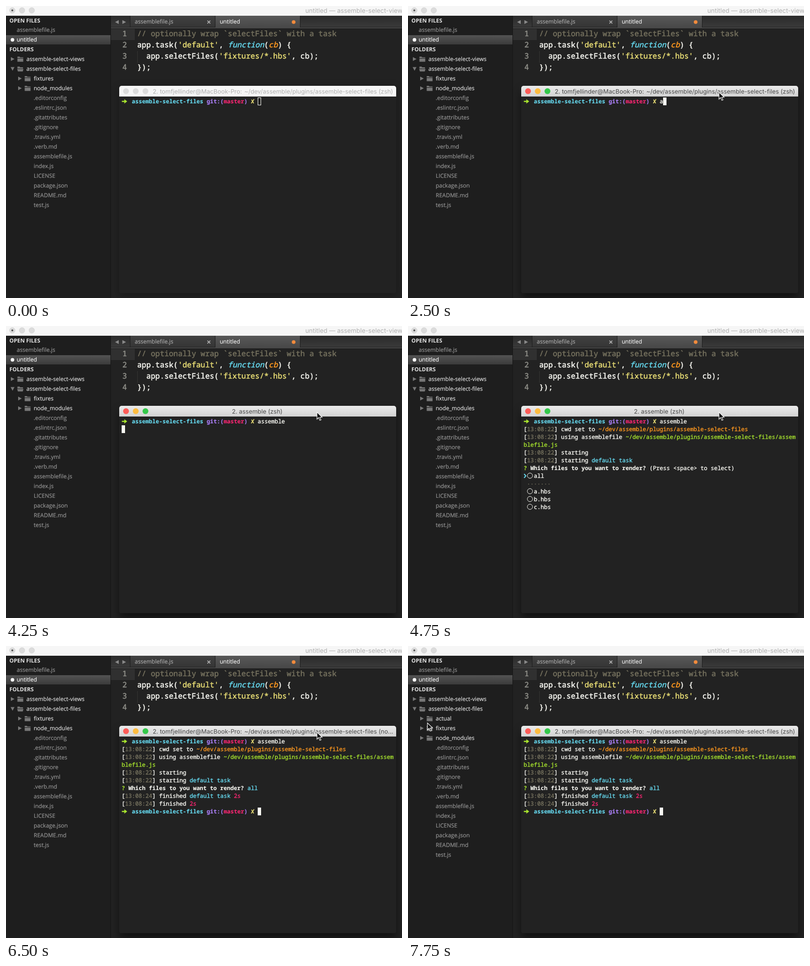
An HTML page that plays this animation: 815 px wide and 600 px high, repeating every 8000 ms.

```html
<!DOCTYPE html>
<html lang="en">
<head>
<meta charset="utf-8">
<title>Editor and terminal</title>
<style>
  html, body { margin: 0; width: 100%; height: 100%; overflow: hidden; background: #222; }
  svg { display: block; width: 815px; height: 600px; text-rendering: geometricPrecision; }
  text { white-space: pre; stroke-width: 0; stroke-linejoin: round; }
  .ui { font: 11.6px "Open Sans", "Noto Sans", sans-serif; stroke-width: .2px; }
  .head { font: bold 11.3px "Open Sans", "Noto Sans", sans-serif; }
  .app { font: 12.9px Inter, Roboto, sans-serif; }
  .title { font: 12.45px Inter, Roboto, sans-serif; }
  .code { font: 15.55px "Noto Sans Mono", "DejaVu Sans Mono", monospace; stroke-width: .5px; }
  .term { font: 11.667px "Noto Sans Mono", "DejaVu Sans Mono", monospace; stroke-width: .4px; }
  .bold { font-weight: bold; stroke-width: .1px; }
  .italic { font-style: italic; }
</style>
</head>
<body>
<svg id="stage" viewBox="0 0 815 600" xmlns="http://www.w3.org/2000/svg">
  <defs>
    <linearGradient id="strip" x2="0" y2="1"><stop stop-color="#2b2b2b"/><stop offset="1" stop-color="#3a3a3a"/></linearGradient>
    <linearGradient id="tab" x2="0" y2="1"><stop stop-color="#414141"/><stop offset="1" stop-color="#353535"/></linearGradient>
    <linearGradient id="tabOn" x2="0" y2="1"><stop stop-color="#585858"/><stop offset="1" stop-color="#484848"/></linearGradient>
    <linearGradient id="row" x2="0" y2="1"><stop stop-color="#535353"/><stop offset="1" stop-color="#3b3b3b"/></linearGradient>
    <linearGradient id="bar" x2="0" y2="1"><stop stop-color="#ebebeb"/><stop offset="1" stop-color="#d2d2d2"/></linearGradient>
    <filter id="blur" x="-20%" y="-20%" width="140%" height="140%"><feGaussianBlur stdDeviation="9"/></filter>
  </defs>
  <g id="editor"></g>
  <g id="tree"></g>
  <g id="terminal"></g>
  <path id="mouse" d="M0 0V14.5l3.4-3.2 2.5 5.6 2.4-1-2.4-5.4h4.7z" fill="#111" stroke="#fff" stroke-width="1.1"/>
</svg>
<script>
const LOOP = 8000;
const C = {
  white: '#f8f8f2', gray: '#75715e', cyan: '#66d9ef', green: '#a6e22e',
  orange: '#fd971f', yellow: '#e6db74', pink: '#f92672', purple: '#ae81ff'
};
const $ = id => document.getElementById(id);
const esc = s => s.replace(/&/g, '&amp;').replace(/</g, '&lt;');
const text = (x, y, s, fill, cls, extra = '') =>
  `<text x="${x}" y="${y}" fill="${fill}" stroke="${fill}" class="${cls}" ${extra}>${esc(s)}</text>`;
const rect = (x, y, w, h, fill, extra = '') =>
  `<rect x="${x}" y="${y}" width="${w}" height="${h}" fill="${fill}" ${extra}/>`;
const dot = (x, y, r, fill, extra = '') => `<circle cx="${x}" cy="${y}" r="${r}" fill="${fill}" ${extra}/>`;
const path = (x, y, d, fill, extra = '') =>
  `<path transform="translate(${x} ${y})" d="${d}" fill="${fill}" ${extra}/>`;

const RIGHT = 'M-3.5-4L4 0-3.5 4z', LEFT = 'M3.5-4L-4 0 3.5 4z', DOWN = 'M-4-3.5H4L0 4z';

// Editor: window bar, tabs and code
function codeLine(n, parts) {
  const y = 39 + 23 * n;
  return text(239.5, y, String(n), '#90908a', 'code') + parts.map(([col, s, color, cls = '']) =>
    text(270 + col * 9.33, y, s, C[color], 'code ' + cls)).join('');
}

function tabs() {
  return rect(216, 20, 599, 24, 'url(#strip)') +
    rect(256, 20, 175, 24, 'url(#tab)') +
    rect(216, 43, 599, 1, '#222') +
    rect(431, 20, 174, 24, 'url(#tabOn)') +
    [255, 430, 605].map(x => rect(x, 20, 1, 24, '#1c1c1c')).join('') +
    rect(216, 44, 599, 2, '#484848') + rect(216, 46, 599, 1, '#1c1c1c') +
    path(228.5, 33, LEFT, '#8a8a8a') + path(243, 33, RIGHT, '#8a8a8a') +
    text(265, 36, 'assemblefile.js', '#a8a8a8', 'ui') +
    path(417.5, 33, 'M-3-3L3 3M3-3L-3 3', 'none', 'stroke="#b8b8b8" stroke-width="1.7"') +
    text(440, 36, 'untitled', '#eee', 'ui') +
    dot(592, 33, 3.8, '#f28b3c');
}

function editor() {
  return rect(0, 0, 815, 600, '#222') +
    rect(0, 0, 815, 20, '#f6f6f6') +
    [13, 33, 53].map(x => dot(x, 9, 5.7, '#dcdcdc', 'stroke="#cfcfcf" stroke-width=".7"')).join('') +
    dot(13, 9, 2, '#555') +
    text(616, 14, 'untitled — assemble-select-view', '#b0b0b0', 'app') +
    tabs() +
    rect(216, 47, 49, 23, '#303030') +
    '<path d="M270.5 93v23" stroke="#4a4a45" stroke-dasharray="1 1"/>' +
    codeLine(1, [[0, '// optionally wrap `selectFiles` with a task', 'gray']]) +
    codeLine(2, [[0, 'app.task(', 'white'], [9, "'default'", 'yellow'], [18, ',', 'white'],
      [20, 'function', 'cyan', 'italic'], [28, '(', 'white'], [29, 'cb', 'orange', 'italic'],
      [31, ') {', 'white']]) +
    codeLine(3, [[2, 'app.selectFiles(', 'white'], [18, "'fixtures/*.hbs'", 'yellow'], [34, ', cb);', 'white']]) +
    codeLine(4, [[0, '});', 'white']]);
}

// Sidebar
const FILES = ['.editorconfig', '.eslintrc.json', '.gitattributes', '.gitignore', '.travis.yml',
  '.verb.md', 'assemblefile.js', 'index.js', 'LICENSE', 'package.json', 'README.md', 'test.js'];

function folder(x, y, name, open) {
  const body = open ? 'M0-4.5h4.5l1 1.5h6v2.5H0zM-.5.5h13L11 5.5H1z' : 'M0-5h4.5l1 1.5H12v1.5H0zM0-1h12v6.5H0z';
  return path(x, y, open ? DOWN : RIGHT, '#777') + path(x + 10, y, body, '#777') +
    text(x + 28.5, y + 4, name, '#dcdcdc', 'ui');
}

function tree(hasOutput) {
  const dirs = hasOutput ? ['actual', 'fixtures', 'node_modules'] : ['fixtures', 'node_modules'];
  const top = 149 + 20 * dirs.length;
  return rect(0, 20, 215, 580, '#1e1e1e') + rect(215, 20, 1, 580, '#161616') +
    text(7, 34, 'OPEN FILES', '#e2e2e2', 'head') +
    text(22, 53, 'assemblefile.js', '#959595', 'ui') +
    rect(0, 60, 215, 19, 'url(#row)') +
    dot(13.3, 69.5, 3.7, '#fff') + text(22, 73, 'untitled', '#f2f2f2', 'ui') +
    text(7, 93, 'FOLDERS', '#e2e2e2', 'head') +
    folder(13.5, 109, 'assemble-select-views') +
    folder(13.5, 129, 'assemble-select-files', true) +
    dirs.map((name, i) => folder(28.5, 149 + 20 * i, name)).join('') +
    FILES.map((name, i) => text(57, top + 4 + 20 * i, name, '#959595', 'ui')).join('');
}

// Terminal
const X = col => 238 + 7 * col;
const Y = row => 196 + 16 * row;
const line = (row, ...parts) => parts.map(([col, s, color, cls = '']) =>
  text(X(col), Y(row) + 4, s, C[color], 'term ' + cls)).join('');
const stamp = (row, time, ...parts) =>
  line(row, [0, '[', 'white'], [1, time, 'gray'], [9, ']', 'white'], ...parts);
const block = (row, col) => rect(X(col), Y(row) - 8, 7, 16, C.white);

function prompt(row) {
  return path(238, Y(row), 'M.5-1.2h5v-3.3l6 4.5-6 4.5v-3.3h-5z', C.green) +
    line(row, [3, 'assemble-select-files', 'cyan', 'bold'], [25, 'git:(', 'purple', 'bold'],
      [30, 'master', 'pink', 'bold'], [36, ')', 'purple', 'bold']) +
    path(504, Y(row), 'M.8 4L6.6-4.6M1.4-3.6L5.8 4', 'none', `stroke="${C.yellow}" stroke-width="1.7"`);
}

function log() {
  return stamp(1, '13:08:22', [11, 'cwd set to', 'white'], [22, '~/dev/assemble/plugins/assemble-select-files', 'orange']) +
    stamp(2, '13:08:22', [11, 'using assemblefile', 'white'],
      [30, '~/dev/assemble/plugins/assemble-select-files/assem', 'green']) +
    line(3, [0, 'blefile.js', 'green']) +
    stamp(4, '13:08:22', [11, 'starting', 'white']) +
    stamp(5, '13:08:22', [11, 'starting', 'white'], [20, 'default task', 'cyan']);
}

const question = () => line(6, [0, '?', 'green', 'bold'], [2, 'Which files to you want to render?', 'white', 'bold']);

function option(row, name, picked) {
  const color = picked ? C.green : C.white;
  const y = Y(row) - 0.5;
  return dot(251, y, 5.4, 'none', `stroke="${color}"`) +
    (picked ? dot(251, y, 2.8, color) : '') + line(row, [3, name, 'white']);
}

const divider = row => Array.from({ length: 7 }, (_, i) =>
  rect(X(1 + i) + 2.5, Y(row), 1.6, 1.6, C.gray)).join('');

function choices(picked) {
  return question() + (picked ? '' : line(6, [37, '(Press <space> to select)', 'white'])) +
    path(238, Y(7), 'M1-4L4.5 0 1 4', 'none', `stroke="${C.cyan}" stroke-width="2"`) +
    option(7, 'all', picked) + divider(8) +
    ['a.hbs', 'b.hbs', 'c.hbs'].map((name, i) => option(9 + i, name)).join('');
}

function result() {
  return question() + line(6, [37, 'all', 'cyan']) +
    stamp(7, '13:08:24', [11, 'finished', 'white'], [20, 'default task', 'cyan'], [33, '2s', 'pink']) +
    stamp(8, '13:08:24', [11, 'finished', 'white'], [20, '2s', 'pink']) +
    prompt(9) + block(9, 40);
}

const SCREENS = {
  input: s => s.active ? block(0, 40 + s.typed)
    : '<rect x="518.5" y="188.5" width="6" height="15" fill="none" stroke="#f8f8f2"/>',
  started: () => block(1, 0),
  log: () => log() + block(6, 0),
  ask: () => log() + choices(false),
  picked: () => log() + choices(true),
  done: () => log() + result()
};

function windowTitle(s) {
  const color = s.active ? '#484848' : '#b0b0b0';
  if (s.short) return text(517, 180, `2. assemble ${s.proc}`, color, 'title', 'text-anchor="middle"');
  return text(302, 180, '2. tomfjellinder@MacBook-Pro:', color, 'title') +
    text(490.5, 180, `~/dev/assemble/plugins/assemble-select-files ${s.proc}`, color, 'title');
}

function terminal(s) {
  const lights = s.active ? ['#fc5b57', '#fdbc40', '#34c84a'] : ['#dcdcdc', '#dcdcdc', '#dcdcdc'];
  return rect(233, s.active ? 174 : 168, 570, 426, '#000', `filter="url(#blur)" opacity="${s.active ? 0.5 : 0.3}"`) +
    rect(233, 164, 570, 426, '#222', 'rx="4"') +
    path(233, 164, 'M0 22V5a5 5 0 0 1 5-5H565a5 5 0 0 1 5 5V22z', s.active ? 'url(#bar)' : '#f6f6f6') +
    lights.map((c, i) => dot(247 + 20 * i, 175, 6, c)).join('') +
    windowTitle(s) + prompt(0) +
    line(0, [40, 'assemble'.slice(0, s.typed), 'white']) + SCREENS[s.screen](s);
}

// Each step overrides part of the state before it
const STEPS = [
  [0, { active: false, typed: 0, screen: 'input', short: false, proc: '(zsh)', output: false, mouse: null }],
  [750, { mouse: [670, 140] }],
  [1000, { mouse: [646, 170] }],
  [1250, { mouse: [640, 177] }],
  [1500, { active: true }],
  [2500, { typed: 1 }],
  [2750, { typed: 2 }],
  [3000, { typed: 3 }],
  [3500, { typed: 5 }],
  [3750, { typed: 7 }],
  [4000, { typed: 8 }],
  [4250, { screen: 'started', short: true }],
  [4500, { screen: 'log' }],
  [4750, { screen: 'ask' }],
  [6000, { screen: 'picked', proc: '(node)' }],
  [6500, { screen: 'done', short: false, proc: '(no...' }],
  [6750, { output: true }],
  [7000, { mouse: [376, 182] }],
  [7250, { mouse: [108, 194], proc: '(zsh)' }],
  [7500, { mouse: [105, 190] }],
  [7750, { mouse: [40, 158] }]
];

let shown = -1;
function draw(t) {
  const step = STEPS.filter(([at]) => at <= t).length;
  if (step === shown) return;
  shown = step;
  const s = Object.assign({}, ...STEPS.slice(0, step).map(([, change]) => change));
  $('tree').innerHTML = tree(s.output);
  $('terminal').innerHTML = terminal(s);
  $('mouse').setAttribute('visibility', s.mouse ? 'visible' : 'hidden');
  if (s.mouse) $('mouse').setAttribute('transform', `translate(${s.mouse})`);
}

$('editor').innerHTML = editor();
const start = performance.now();
function tick() {
  draw((performance.now() - start) % LOOP);
  requestAnimationFrame(tick);
}
tick();
</script>
</body>
</html>
```
